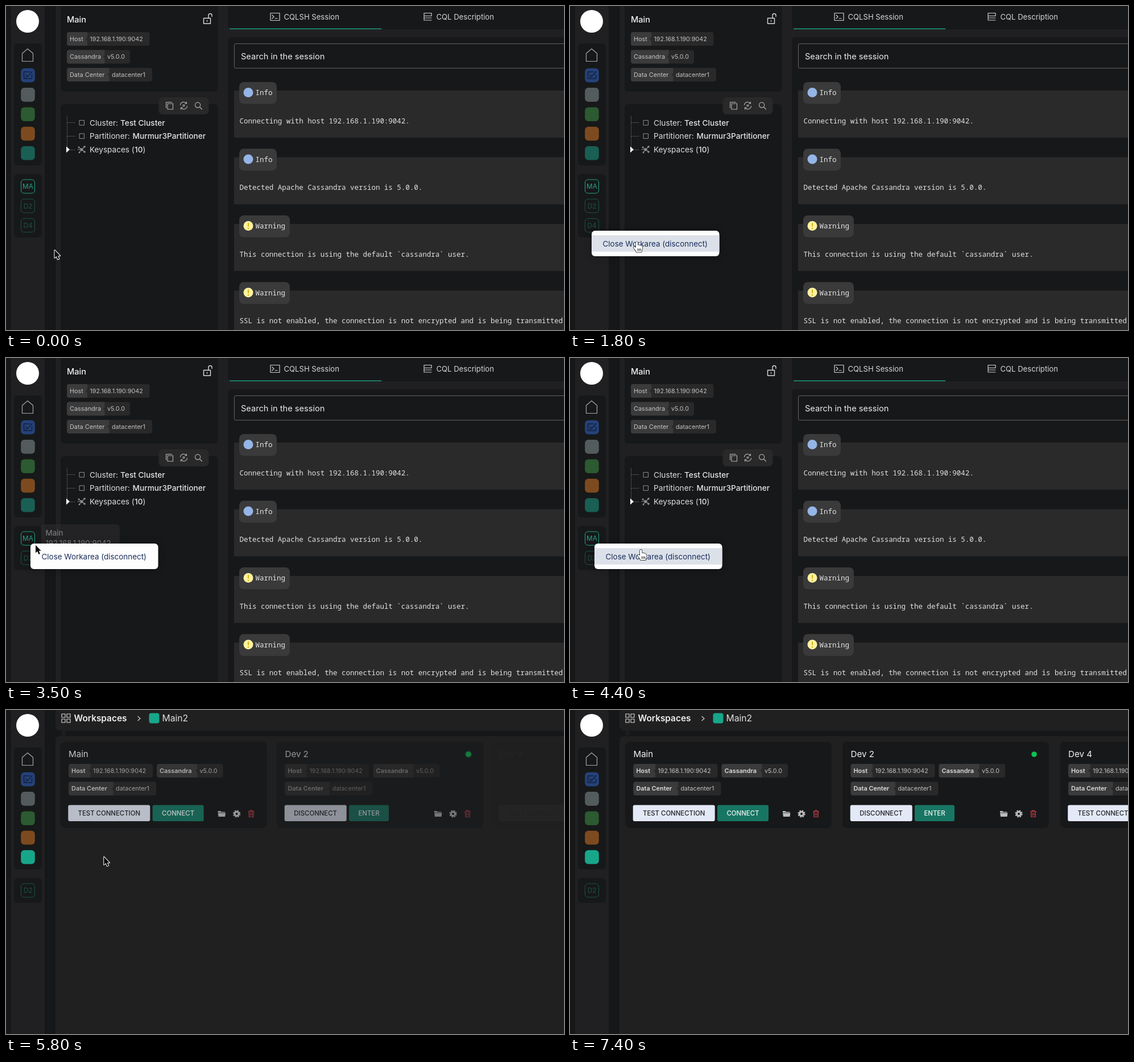
An HTML page with a canvas for the animation above (7.5 s loop, 981x571 px).

```html
<!DOCTYPE html>
<html lang="en">
<head>
<meta charset="utf-8">
<title>Closing work areas</title>
<style>
html, body { margin: 0; width: 100%; height: 100%; overflow: hidden; background: #161718; }
canvas { display: block; }
</style>
</head>
<body>
<canvas id="stage" width="981" height="571"></canvas>
<script>
const stage = document.getElementById('stage');
const LOOP = 7500, STEP = 100;
const DARK = '#171819', GREY = '#202022', TEAL = '#1fa688', WHITE = '#f2f2f2';
const SANS = 'Inter, sans-serif', MONO = '"Noto Sans Mono", monospace';
const HOST = '192.168.1.190:9042';

// One canvas per nesting level, so that a group fades as a whole
const layers = [stage, stage.cloneNode(), stage.cloneNode()].map(c => c.getContext('2d'));
let ctx = layers[0];

const ramp = (t, from, to) => Math.min(1, Math.max(0, (t - from) / (to - from)));
const smooth = p => p * p * (3 - 2 * p);

function withAlpha(alpha, draw) {
  if (alpha <= 0) return;
  const base = ctx;
  if (alpha < 1) {
    ctx = layers[layers.indexOf(base) + 1];
    ctx.clearRect(0, 0, 981, 571);
  }
  ctx.save();
  ctx.setTransform(base.getTransform());
  draw();
  ctx.restore();
  if (alpha < 1) {
    base.save();
    base.resetTransform();
    base.globalAlpha = alpha;
    base.drawImage(ctx.canvas, 0, 0);
    base.restore();
    ctx = base;
  }
}

function box(x, y, w, h, fill, r = 0, stroke) {
  ctx.beginPath();
  ctx.roundRect(x, y, w, h, r);
  if (fill) { ctx.fillStyle = fill; ctx.fill(); }
  if (stroke) { ctx.strokeStyle = stroke; ctx.lineWidth = 1; ctx.stroke(); }
}

function disc(x, y, r, fill) {
  ctx.beginPath();
  ctx.arc(x, y, r, 0, 7);
  ctx.fillStyle = fill;
  ctx.fill();
}

function text(s, x, y, size, color = WHITE, weight = 400, family = SANS) {
  ctx.font = `${weight} ${size}px ${family}`;
  ctx.fillStyle = color;
  ctx.fillText(s, x, y);
}

function icon(d, x, y, { fill, stroke, width = 1.2 }) {
  const path = new Path2D(d);
  ctx.save();
  ctx.translate(x, y);
  ctx.lineJoin = ctx.lineCap = 'round';
  if (stroke) { ctx.strokeStyle = stroke; ctx.lineWidth = width; ctx.stroke(path); }
  if (fill) { ctx.fillStyle = fill; ctx.fill(path, 'evenodd'); }
  ctx.restore();
}

function chip(x, y, label, value, split, width, weight = 400) {
  box(x, y, width, 24, '#29292a', 4);
  box(x, y, split, 24, '#3b3b3c', [4, 0, 0, 4]);
  icon('M0 -3L-3 0L0 3Z', x + split, y + 12, { fill: '#29292a' });
  text(label, x + 5, y + 15.5, 10.9, weight > 400 ? '#dededf' : '#c4c4c5', weight);
  text(value, x + split + 4.5, y + 15.5, 10.7, '#c2c2c3');
}

function sidebar(areas, active) {
  box(0, 0, 981, 571, '#161718');
  box(9, 0, 59, 571, GREY);
  disc(38, 27, 20, '#ffffff');
  box(14, 66, 49, 215, DARK, 6);
  icon('M-9.5 11V-3L0 -11L9.5 -3V11Z', 38, 86.5, { stroke: '#a5a5a6' });
  const teal = active ? '#18a68a' : '#195f53';
  ['#25427a', '#535b5d', '#2c5a31', '#7d4a1f', teal].forEach((c, i) =>
    box(26.2, 109.8 + i * 34.3, 24.6, 24.6, c, 6));
  icon('M3 -6H-7V6H7V-1M-3.5 -1L-.5 2.5L7.5 -6.5M-4 3.5H-2', 38.5, 122, { stroke: '#14213c', width: 1.6 });
  box(14, 296, 49, 44 + (areas.length - 1) * 34, DARK, 6);
  areas.forEach((name, i) => withAlpha(name === 'MA' ? 1 : 0.42, () => {
    box(26.5, 306 + i * 34.3, 24, 24, null, 5, TEAL);
    ctx.textAlign = 'center';
    text(name, 38.5, 322.3 + i * 34.3, 11.8, TEAL);
  }));
}

function message(i, kind, body) {
  const y = 149 + i * 117.5, warning = kind === 'Warning';
  box(401, y, 580, 83, '#2a2a2b');
  box(410, y - 15, warning ? 89 : 66, 38.5, '#3a3a3b', 8);
  disc(426, y + 3.5, 8.5, warning ? '#fcf3a0' : '#94b5e6');
  if (warning) {
    box(425, y - 2, 2, 7, '#d8ae12', 1);
    disc(426, y + 8, 1.3, '#d8ae12');
  }
  text(kind, 438.5, y + 8, 12.47, '#e6e6e6', 400, MONO);
  text(body, 410.5, y + 57.5, 12.47, '#e2e2e2', 400, MONO);
}

function session() {
  box(86, 0, 895, 571, GREY);
  box(86, 0, 1, 571, '#111213');
  box(96, 0, 276.5, 151, DARK, [0, 0, 6, 6]);
  text('Main', 107, 29, 14.6, WHITE, 500);
  icon('M-6.5 0H5.5V9.5H-6.5ZM2 0V-5A3 3 0 0 1 8 -5V-3M-.5 4V5.5', 354, 21.5, { stroke: '#dcdcdc', width: 1.4 });
  chip(107, 46, 'Host', HOST, 36, 145.5);
  chip(107, 77.5, 'Cassandra', 'v5.0.0', 66.5, 111);
  chip(107, 109, 'Data Center', 'datacenter1', 74.5, 150);

  box(96, 173, 276.5, 398, DARK, [6, 6, 0, 0]);
  box(268.5, 161, 88, 30, '#29292a', 7);
  const tool = { stroke: '#b5b5b6', width: 1.1 };
  icon('M-3 -3.5H6.5V6.5H-3ZM-5.5 4V-6H4.5', 287, 175.5, tool);
  icon('M-6 -1A6 6 0 0 1 5 -3.5M5 -6.5V-3.5H2M6 1A6 6 0 0 1 -5 3.5M-5 6.5V3.5H-2M-1.5 0A1.5 1.5 0 1 0 1.5 0A1.5 1.5 0 1 0 -1.5 0', 312.5, 175.5, tool);
  icon('M-5.5 -1A4.6 4.6 0 1 0 3.7 -1A4.6 4.6 0 1 0 -5.5 -1M2.5 2.5L6.5 6.5', 338, 175.5, tool);

  ctx.save();
  ctx.setLineDash([1, 1.4]);
  ctx.strokeStyle = '#8a8a8b';
  ctx.lineWidth = 1;
  ctx.stroke(new Path2D('M107.5 194V253M108 205.5H121M108 229.5H121M108 253.5H121'));
  ctx.restore();
  box(129, 201.5, 8.5, 8.5, null, 0, '#8e8e8f');
  box(129, 225, 8.5, 8.5, null, 0, '#8e8e8f');
  icon('M0 0L-5 -4M0 0L5 -5M0 0L5 4M0 0L-4 5M0 0H-7', 133, 253, { stroke: '#8e8e8f' });
  [[0, 0, 2.6], [-5, -4, 1.4], [5, -5, 1.8], [5, 4, 1.8], [-4, 5, 1.5]].forEach(([x, y, r]) =>
    disc(133 + x, 253 + y, r, '#8e8e8f'));
  icon('M0 -5.5L6 0L0 5.5Z', 106, 253, { fill: '#ffffff' });
  text('Cluster:', 147, 210.5, 13.7, '#dedede');
  text('Test Cluster', 201, 210.5, 13.7, '#e6e6e6', 500);
  text('Partitioner:', 147, 234, 13.7, '#dedede');
  text('Murmur3Partitioner', 222.5, 234, 13.7, '#e6e6e6', 500);
  text('Keyspaces (', 147, 257.5, 13.6, '#dedede');
  text('10', 226, 257.5, 13.6, '#e6e6e6', 500);
  text(')', 240.5, 257.5, 13.6, '#dedede');

  box(390, 0, 591, 41, DARK, [0, 0, 0, 6]);
  box(393, 39.5, 267, 1.5, '#1b9a7c');
  const tab = { stroke: '#cfcfcf', width: 1.2 };
  icon('M-8 -6.5H8V6.5H-8ZM-5 -3L-2 0L-5 3M0 3H4', 473, 19, tab);
  text('CQLSH Session', 488.5, 23.5, 13.1, '#d6d6d6');
  icon('M-6.5 -6.5H6.5V-1.5H-6.5ZM-6.5 2H6.5M-6.5 6H6.5M-6.5 -1V6', 741.5, 19, tab);
  text('CQL Description', 756.5, 23.5, 13.1, '#d6d6d6');

  box(390, 55, 591, 516, DARK, [6, 0, 0, 0]);
  box(401.5, 66.5, 600, 43, null, 2, '#646465');
  text('Search in the session', 413, 94, 14.6, '#ececec');
  message(0, 'Info', `Connecting with host ${HOST}.`);
  message(1, 'Info', 'Detected Apache Cassandra version is 5.0.0.');
  message(2, 'Warning', 'This connection is using the default `cassandra` user.');
  message(3, 'Warning', 'SSL is not enabled, the connection is not encrypted and is being transmitted');
}

function workspaceBackdrop() {
  box(86, 0, 895, 571, '#161718');
  box(87, 0, 894, 36.5, '#202021', [0, 0, 0, 8]);
  box(98, 37, 6.5, 8, '#1e1e1f');
  box(87, 46, 894, 525, '#202021', [8, 0, 0, 0]);
}

function breadcrumb() {
  icon('M-7.5 -7.5H-1.5V-1.5H-7.5ZM1.5 -7.5H7.5V-1.5H1.5ZM-7.5 1.5H-1.5V7.5H-7.5ZM1.5 1.5H7.5V7.5H1.5Z', 105.5, 14.5, { stroke: '#dedede', width: 1.1 });
  text('Workspaces', 119.5, 19.5, 15.4, '#efefef', 600);
  icon('M-2 -3.5L2 0L-2 3.5', 234, 15, { stroke: '#c4c4c4', width: 1.5 });
  box(251.5, 5.5, 18, 18, '#18a68a', 4);
  text('Main2', 274.5, 20, 15.7, '#e2e2e2');
}

function button(x, width, label, fill, color) {
  box(x, 167.5, width, 28.5, fill, 3);
  ctx.save();
  ctx.textAlign = 'center';
  text(label, x + width / 2, 186, 11.4, color, 500);
  ctx.restore();
}

function card(t, { x, start, title, open }) {
  const p = 1 - (1 - ramp(t, start, start + 1000)) ** 3;
  withAlpha(p ** 1.6, () => {
    ctx.translate(x - 10 * (1 - p), 0);
    box(0, 56, 363, 152, DARK, 8);
    text(title, 14.5, 83, 15.1, WHITE);
    withAlpha(ramp(t, start + 180, start + 400), () => {
      chip(14.5, 95, 'Host', HOST, 38.5, 148, 600);
      chip(169.5, 95, 'Cassandra', 'v5.0.0', 71, 116.5, 600);
      chip(14.5, 126.5, 'Data Center', 'datacenter1', 78.5, 154, 600);
    });
    const first = open ? 109 : 144;
    button(13.7, first, open ? 'DISCONNECT' : 'TEST CONNECTION', '#e3e9f6', '#202126');
    button(18 + first, open ? 70 : 90, open ? 'ENTER' : 'CONNECT', '#177663', '#f0f5f4');
    icon('M-6.5 -5H-2L-.5 -3.5H6V-2.3H-6.5ZM-6.5 -1.5H7L6 5H-5.5Z', 283.5, 183, { fill: '#bcbcbd' });
    ctx.save();
    ctx.setLineDash([2.6, 1.8]);
    ctx.strokeStyle = '#bcbcbd';
    ctx.lineWidth = 2;
    ctx.beginPath();
    ctx.arc(310, 183, 5.6, 0, 7);
    ctx.stroke();
    ctx.restore();
    icon('M-5 0A5 5 0 1 0 5 0A5 5 0 1 0 -5 0M-2 0A2 2 0 1 0 2 0A2 2 0 1 0 -2 0', 310, 183, { fill: '#bcbcbd' });
    icon('M-5 -4H5M-2 -4V-5.8H2V-4M-4 -4L-3.6 5.5H3.6L4 -4M-1.4 -1.5V3M1.4 -1.5V3', 335.5, 183, { stroke: '#c8404e', width: 1.2 });
    if (open) {
      const pulse = (1 + Math.cos((t - 6200) / 1200 * Math.PI)) / 2;
      withAlpha(0.3 * pulse, () => disc(337, 78, 6.5, '#0cc152'));
      disc(337, 78, 4.8, '#0cc152');
    }
  });
}

function tooltip(y, name) {
  box(61.5, y, 138.5, 48, '#2d2d2f', 6);
  text(name, 69.5, y + 20, 13.5, '#d5d5d6');
  text(HOST, 69.5, y + 38, 13.2, '#d5d5d6');
}

function menu(x, y, hovered) {
  ctx.save();
  ctx.shadowColor = 'rgba(0,0,0,.35)';
  ctx.shadowBlur = 12;
  box(x, y, 224.5, 45, '#fdfdfd', 6);
  ctx.restore();
  if (hovered) box(x, y + 8, 224.5, 29, '#dce1e9');
  text('Close Workarea (disconnect)', x + 19.5, y + 27.5, 13.45, '#1a2d5c');
}

// Pointer stops: time, x, y
const STOPS = [
  [0, 85, 429.5], [500, 38, 396.5], [1100, 38, 396.5], [1500, 157, 415], [1600, 157, 415],
  [1900, 104, 416], [2200, 104, 416], [2700, 79.5, 336.5], [3000, 43, 328], [3400, 43, 328],
  [3900, 125, 338], [5000, 125, 338], [5500, 155, 254], [6200, 197.5, 264.5], [6500, 200, 268], [7500, 200, 268],
];

function pointerAt(t) {
  const i = STOPS.findIndex(s => s[0] > t);
  const [t0, x0, y0] = STOPS[i - 1], [t1, x1, y1] = STOPS[i];
  const p = smooth(ramp(t, t0, t1));
  return [x0 + (x1 - x0) * p, y0 + (y1 - y0) * p];
}

function pointer(x, y, hand) {
  if (hand) {
    icon('M-2 1.5C-2 -1 1.5 -1 1.5 1.5V6C3 5 4.5 5.5 5 6.5C6.5 6 7.5 6.5 8 7.5C9.5 7.5 9.5 9 9.5 10C9.5 13 8.5 14 8 18H-1C-2 15 -5 12.5 -6 10C-6 8 -4 8 -2 10.5Z', x, y, { stroke: '#111', width: 1.4, fill: '#fff' });
    icon('M1.5 12V15.5M4 12V15.5M6.3 12V15.5', x, y, { stroke: '#111', width: 1 });
  } else {
    icon('M.5 .8V14.5L3.7 11.6L6 17L8.4 16L6.2 10.8H10.2Z', x, y, { stroke: '#fff', width: 2, fill: '#0b0b0b' });
  }
}

const CARDS = [
  { x: 97, start: 5320, title: 'Main' },
  { x: 479, start: 5470, title: 'Dev 2', open: true },
  { x: 861.5, start: 5770, title: 'Dev 4' },
];

function draw(t) {
  const left = t >= 4600;
  sidebar(left ? ['D2'] : t < 2400 ? ['MA', 'D2', 'D4'] : ['MA', 'D2'], left);

  const fade = ramp(t, 4400, 4800);
  if (fade < 1) session();
  withAlpha(fade, workspaceBackdrop);
  withAlpha(ramp(t, 5000, 5300), breadcrumb);
  CARDS.forEach(c => card(t, c));

  withAlpha(ramp(t, 300, 600) * (1 - ramp(t, 700, 930)), () => tooltip(361, 'Dev 4'));
  withAlpha(ramp(t, 3000, 3200) * (1 - ramp(t, 3400, 3630)), () => tooltip(293, 'Main'));

  const [x, y] = pointerAt(t);
  const hand = (t >= 1300 && t < 2300) || (t >= 3700 && t < 4500);
  if (t >= 800 && t < 2300) menu(38, 396, hand);
  if (t >= 3500 && t < 4500) menu(43, 327, hand);
  withAlpha(1 - ramp(t, 6300, 6600), () => pointer(x, y, hand));
}

function tick(now) {
  draw(Math.floor(now % LOOP / STEP) * STEP);
  requestAnimationFrame(tick);
}
requestAnimationFrame(tick);
</script>
</body>
</html>
```
